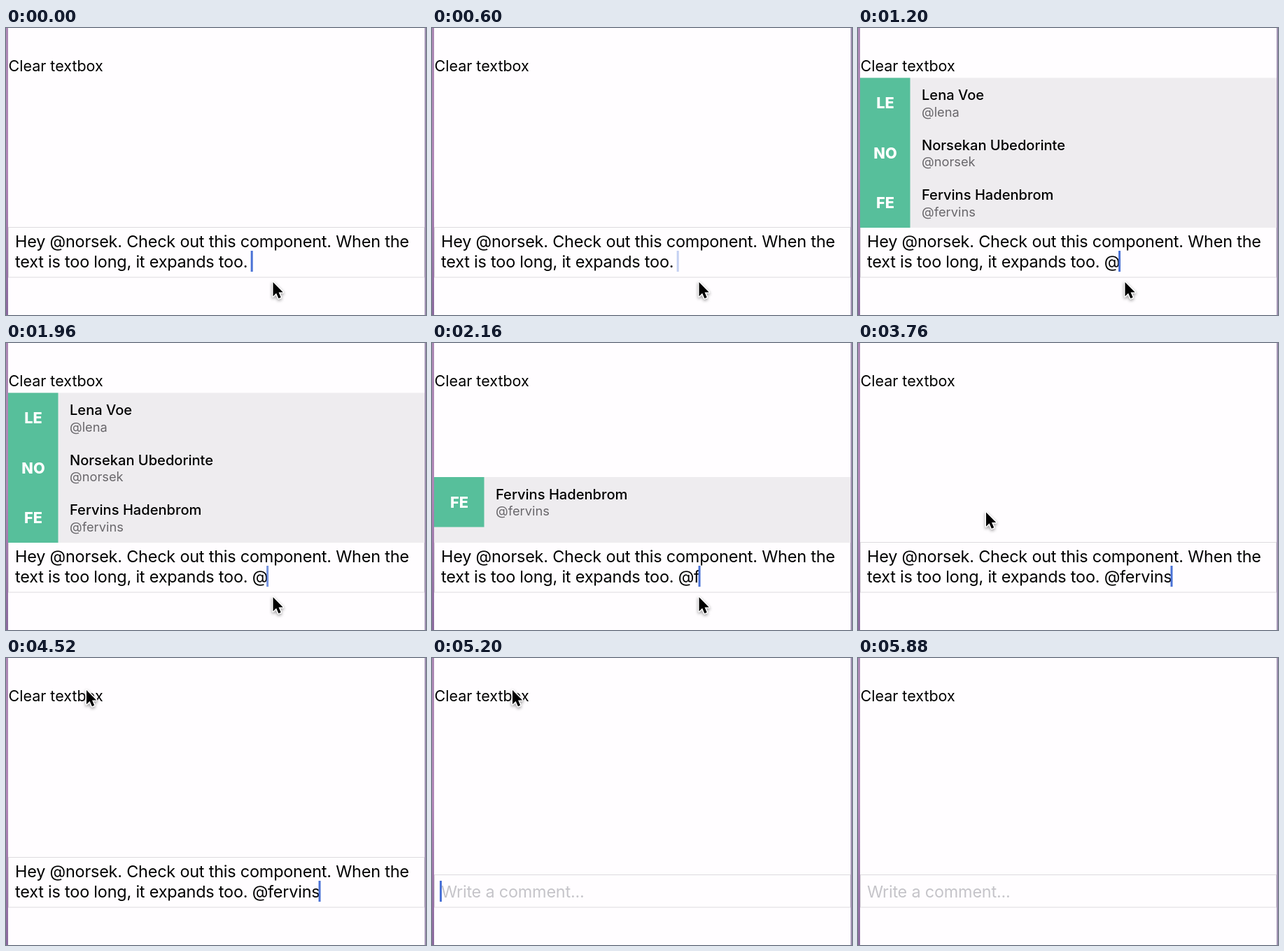
These frames come from a looping animation (600 px wide and 411 px high, 5920 ms). An HTML page with a canvas:

```html
<!DOCTYPE html>
<html lang="en">
<head>
<meta charset="utf-8">
<title>Mention box</title>
<style>
html, body { margin: 0; width: 100%; height: 100%; overflow: hidden; background: #fffdff; }
canvas { display: block; }
</style>
</head>
<body>
<canvas id="stage" width="600" height="411"></canvas>
<script>
const ctx = document.getElementById('stage').getContext('2d');
const LOOP = 5920, AT = 1000, FILTER = 2089, PICK = 3350, CLEAR = 5150;
const ROW = 71.6, BASE = 286;
const users = [
  ['LE', 'Lena Voe', '@lena'],
  ['NO', 'Norsekan Ubedorinte', '@norsek'],
  ['FE', 'Fervins Hadenbrom', '@fervins'],
];
const pointerPath = [
  [0, 381.5, 364], [2450, 381.5, 364], [2860, 186, 244.5], [3020, 183, 242.5],
  [3900, 183, 242.5], [4350, 115, 46], [5480, 115, 46], [5800, 276, -34], [LOOP, 276, -34],
];
const arrow = new Path2D('M0 0V20.2L4.6 15.8L7.9 23.2L11.2 21.8L8 14.4H14.2Z');

const clamp = v => Math.min(1, Math.max(0, v));
function ease(v) {
  v = clamp(v);
  return v < .5 ? 2 * v * v : 1 - 2 * (1 - v) ** 2;
}
const smooth = v => v * v * (3 - 2 * v);
const slide = (t, start) => ease((t - start) / 100);

function rect(x, y, w, h, color) {
  ctx.fillStyle = color;
  ctx.fillRect(x, y, w, h);
}

// Returns the x where the text ends.
function text(str, x, y, size, color = '#000', weight = 400, spacing = 0, align = 'left') {
  ctx.font = `${weight} ${size}px Inter, "Open Sans", sans-serif`;
  ctx.letterSpacing = spacing + 'px';
  ctx.textAlign = align;
  ctx.fillStyle = color;
  ctx.fillText(str, x, y);
  return x + ctx.measureText(str).width;
}
const body = (str, y, color) => text(str, 13, y, 23.4, color, 400, -.19);

function drawFrame() {
  rect(0, 0, 600, 411, '#fffdff');
  const edge = ctx.createLinearGradient(0, 0, 0, 411);
  edge.addColorStop(0, '#ab88b4');
  edge.addColorStop(.5, '#b187b8');
  edge.addColorStop(1, '#8a6a9e');
  rect(0, 0, 3, 411, edge);
  rect(598, 0, 2, 411, '#a394b4');
}

function drawList(t) {
  const height = 3 * ROW * slide(t, AT) - 2 * ROW * slide(t, FILTER) - ROW * slide(t, PICK);
  if (height < .1) return;
  const top = BASE - height;
  const shown = t < FILTER ? users : users.slice(2);
  ctx.save();
  ctx.beginPath();
  ctx.rect(3, top, 595, height);
  ctx.clip();
  rect(3, top, 595, height, '#eeecef');
  rect(3, top, 71.5, shown.length * ROW, '#57bf9b');
  shown.forEach(([initials, name, handle], i) => {
    const y = top + i * ROW;
    text(initials, 39, y + 43.8, 21.7, '#fff', 800, 0, 'center');
    text(name, 91, y + 32, 20.1, '#000', 500);
    text(handle, 91, y + 55.5, 18.3, '#69676b');
  });
  ctx.restore();
}

function caretAlpha(t) {
  const last = [0, AT, FILTER, PICK, CLEAR].filter(e => e <= t).pop();
  const p = (t - last) % 1000;
  return p < 850 ? 1 - clamp((p - 500) / 150) : (p - 850) / 150;
}

function drawBox(t) {
  const empty = t >= CLEAR;
  const top = empty ? 310.5 : 285.5;
  ctx.strokeStyle = '#dddbde';
  ctx.lineWidth = 1;
  ctx.strokeRect(3.5, top, 594, 357 - top);
  let end = 13;
  if (empty) {
    body('Write a comment...', 343, '#c5c4c9');
  } else {
    const mention = t < AT ? '' : t < FILTER ? '@' : t < PICK ? '@f' : users[2][2];
    body('Hey @norsek. Check out this component. When the', 314.4);
    end = body('text is too long, it expands too. ' + mention, 343);
  }
  ctx.globalAlpha = caretAlpha(t);
  rect(end - 2, 319, 3, 30, '#4a72d6');
  ctx.globalAlpha = 1;
}

function drawPointer(t) {
  const i = pointerPath.findIndex(k => k[0] > t);
  const [t0, x0, y0] = pointerPath[i - 1], [t1, x1, y1] = pointerPath[i];
  const k = smooth((t - t0) / (t1 - t0));
  ctx.save();
  ctx.translate(x0 + (x1 - x0) * k, y0 + (y1 - y0) * k);
  ctx.shadowColor = 'rgba(0,0,0,.4)';
  ctx.shadowBlur = 4;
  ctx.shadowOffsetY = 2;
  ctx.strokeStyle = '#fff';
  ctx.lineWidth = 3;
  ctx.lineJoin = 'round';
  ctx.stroke(arrow);
  ctx.shadowColor = 'transparent';
  ctx.fillStyle = '#000';
  ctx.fill(arrow);
  ctx.restore();
}

const start = performance.now();
function draw() {
  const t = (performance.now() - start) % LOOP;
  drawFrame();
  text('Clear textbox', 3.5, 62, 21.5);
  drawBox(t);
  drawList(t);
  drawPointer(t);
  requestAnimationFrame(draw);
}
draw();
</script>
</body>
</html>
```
